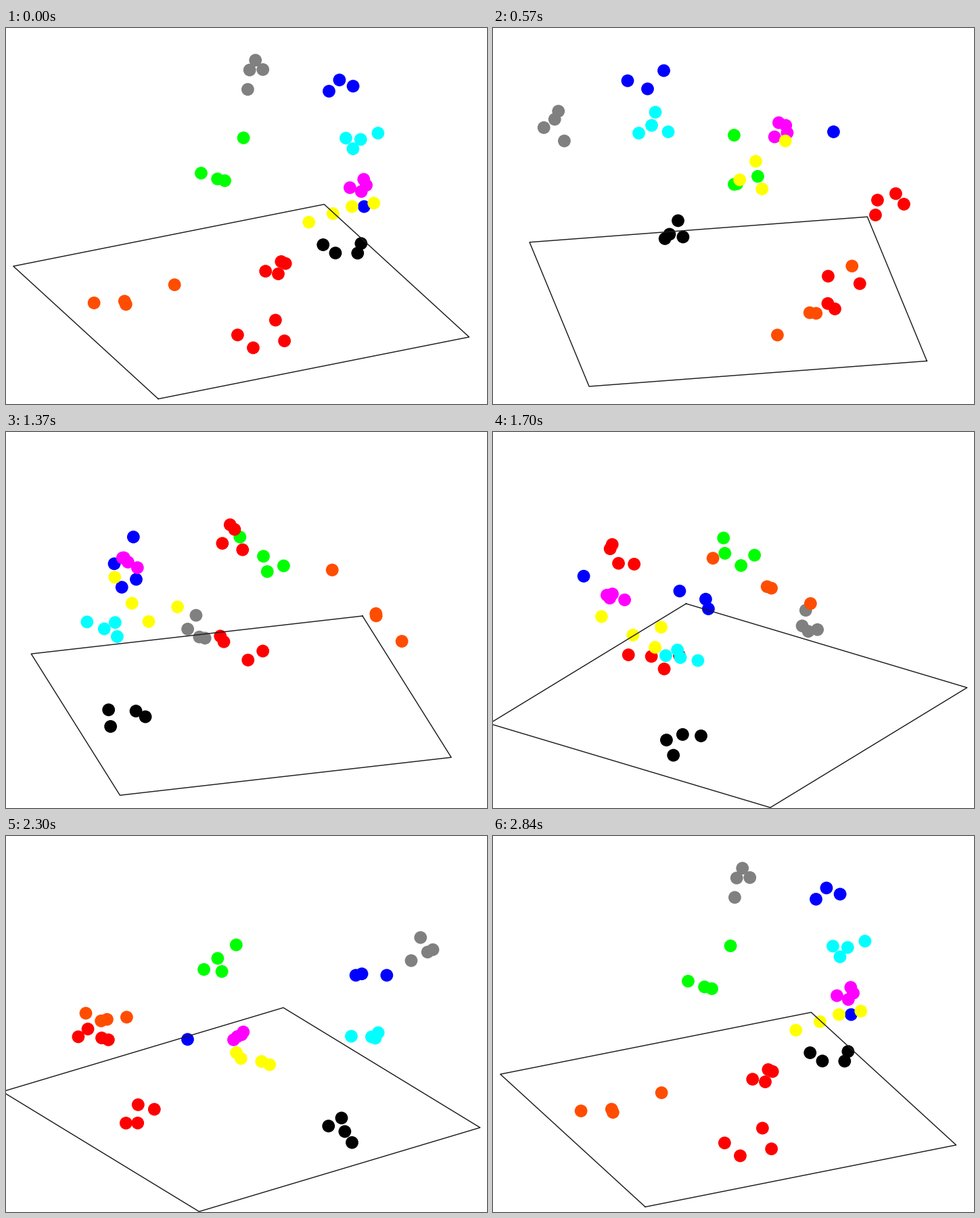
A matplotlib script that plays this animation: 711x556 px, repeating every 2900 ms.

```python
import numpy as np
import matplotlib.pyplot as plt
from matplotlib.animation import FuncAnimation

W, H, DPI = 711, 556, 64
PT = 72 / DPI            # points per pixel
LOOP, TICK = 2900, 10    # ms
CX, CY = 347.7, 404.6    # rotation axis and floor height on screen
TILT = 0.427             # sine of the viewing elevation
RADIUS = 358.5           # half diagonal of the floor
DOT = 18.8
START = -75              # first view, degrees

# Each dot: sideways offset, on-screen depth offset, height of its orbit centre
GROUPS = [
    ("#000000", [(-74.2, -86.8, 371.7), (-86.8, -86, 391),
                 (-93.5, -64.2, 375.7), (-66.8, -69.2, 378.2)]),
    ("#ff0000", [(194.5, -6, 384), (157.7, 10.2, 405.2),
                 (147.7, -5.5, 372.5), (147.2, 19.2, 388.2)]),
    ("#00ff00", [(8.7, -0.5, 159), (43.7, 15.7, 203.7),
                 (8.7, 27.2, 204), (13, 17, 213.4)]),
    ("#0000ff", [(-95.2, -84, 147), (-148.7, -81.2, 159.2),
                 (-119.2, -71, 161), (155.7, -62.5, 216)]),
    ("#00ffff", [(-88.7, -83.2, 236.7), (-107.7, -101.7, 226.2),
                 (-113.2, -91, 235), (-132.2, -83.5, 239)]),
    ("#ff00ff", [(74.7, -71.5, 211.5), (85, -72, 216),
                 (87.2, -68.5, 223.5), (68.5, -63.2, 224.2)]),
    ("#ffff00", [(84.5, -77, 244), (40.7, -67.7, 264.7),
                 (17, -58, 282.5), (50, -38.5, 276.5)]),
    ("#808080", [(-251, -38, 161), (-256.5, -43.5, 178.5),
                 (-272.5, -36.7, 184), (-242.3, -32, 199)]),
    ("#ff4d00", [(183, 64.5, 287.5), (130, 90.2, 331.7),
                 (120.5, 90, 331), (72.7, 104.5, 349.5)]),
    ("#ff0000", [(259.7, 5.5, 255), (247.7, 2.2, 242.7),
                 (220.7, -3.7, 258.2), (217.7, 9, 267.5)]),
]

# Moments at which the view jumps: (first, last, count)
BURSTS = [(70, 570, 8), (620, 1090, 8), (1170, 1640, 8),
          (1700, 2170, 8), (2240, 2700, 8), (2770, 2840, 2)]
JUMPS = np.concatenate([[0]] + [np.round(np.linspace(*b), -1) for b in BURSTS])

# Turn progress in 5 degree steps
KEY_MS = [0, 570, 950, 1370, 2040, 2510, 2840]
KEY_STEP = [0, 15, 25, 34, 51, 63, 72]


def view_angle(ms):
    shown = JUMPS[np.searchsorted(JUMPS, ms, side="right") - 1]
    step = np.round(np.interp(shown, KEY_MS, KEY_STEP))
    return np.radians(START + 5 * step)


def project(pts, a):
    side, depth, height = pts.T
    x = CX + side * np.cos(a) + depth / TILT * np.sin(a)
    y = height + depth * np.cos(a) - TILT * side * np.sin(a)
    return np.column_stack([x, y])


dots = np.array([p for _, group in GROUPS for p in group])
colors = [c for c, group in GROUPS for _ in group]

turn = np.radians(35 + 90 * np.arange(5))
floor = np.column_stack([RADIUS * np.cos(turn),
                         TILT * RADIUS * np.sin(turn),
                         np.full(5, CY)])

fig = plt.figure(figsize=(W / DPI, H / DPI), dpi=DPI, facecolor="white")
ax = fig.add_axes([0, 0, 1, 1])
ax.set(xlim=(0, W), ylim=(H, 0))
ax.axis("off")

start = project(dots, view_angle(0))
scatter = ax.scatter(start[:, 0], start[:, 1], s=(DOT * PT) ** 2,
                     c=colors, linewidths=0, zorder=2)
outline, = ax.plot([], [], color="#1c1c1c", lw=1.45 * PT, zorder=3)
ax.plot([0, W], [H - 0.5] * 2, color="#c0c0c0", lw=PT, zorder=1)


def draw(i):
    a = view_angle(i * TICK)
    scatter.set_offsets(project(dots, a))
    outline.set_data(*project(floor, a).T)
    return scatter, outline


anim = FuncAnimation(fig, draw, frames=LOOP // TICK, interval=TICK,
                     repeat=True, repeat_delay=0, blit=False)
plt.show()
```
